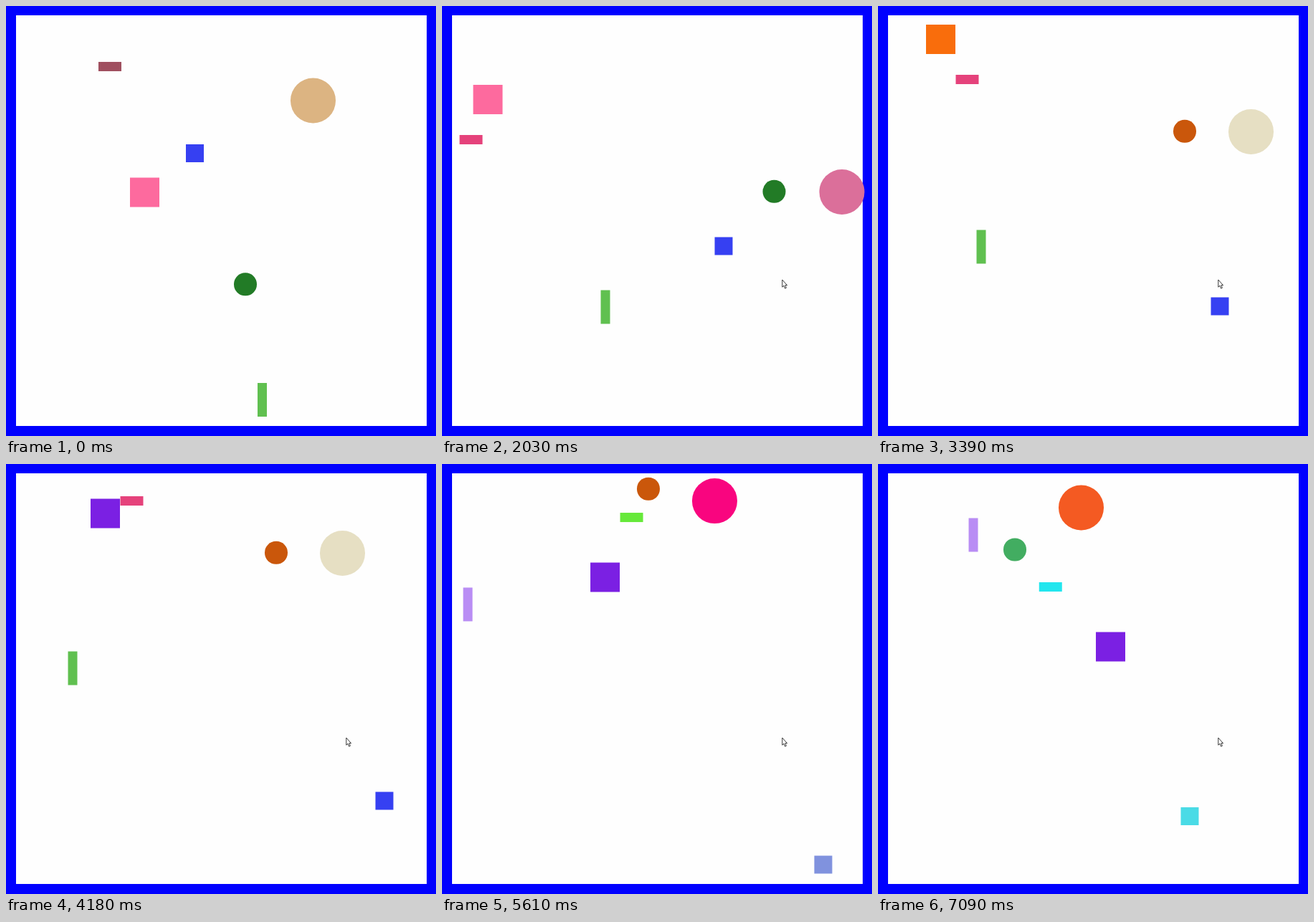
These frames come from a looping animation (600x600 px, 7.15 s). An HTML page without scripts:

```html
<!DOCTYPE html>
<html lang="en">
<head>
<meta charset="utf-8">
<title>Bouncing shapes</title>
<style>
/* --d: distance every shape has travelled along each axis */
@property --d { syntax: "<length>"; inherits: true; initial-value: 0px; }

html, body { margin: 0; width: 100%; height: 100%; overflow: hidden; background: #00f; }

.stage {
  position: relative; width: 600px; height: 600px; overflow: hidden;
  animation: travel 7.15s infinite;
}
.room { position: absolute; left: 14px; top: 12.5px; width: 573px; height: 573.5px; background: #fefefe; }

.shape {
  position: absolute; left: 0; top: 0; width: var(--w); height: var(--h, var(--w));
  background: currentColor;
  transform: translate(var(--x), var(--y));
  animation: 7.15s step-end infinite;
}
.round { border-radius: 50%; }

/* each min/max is one bounce */
.plank {
  --w: 31.5px; --h: 12.5px;
  --x: min(max(129px - var(--d), var(--d) - 105px), 675.25px - var(--d));
  --y: max(min(78px + var(--d), 309.5px - var(--d)), var(--d) - 285.5px);
  animation-name: plank;
}
.ball {
  --w: 62.5px;
  --x: min(max(min(397px + var(--d), 656px - var(--d)), 348.5px + var(--d)), 702.5px - var(--d));
  --y: max(min(max(min(100.5px + var(--d), 357.5px - var(--d)), var(--d) - 333.5px), 447px - var(--d)), var(--d) - 421px);
  animation-name: ball;
}
.box {
  --w: 25px;
  --x: min(251px + var(--d), 873px - var(--d));
  --y: min(193px + var(--d), 929.5px - var(--d));
  animation-name: box;
}
.block {
  --w: 41px;
  --x: max(173px - var(--d), var(--d) - 146.5px);
  --y: max(239.5px - var(--d), var(--d) - 216px);
  animation-name: block;
}
.dot {
  --w: 31.5px;
  --x: min(318px + var(--d), 625.5px - var(--d));
  --y: max(372.3px - var(--d), var(--d) - 347px);
  animation-name: dot;
}
.post {
  --w: 12.5px; --h: 47px;
  --x: max(351px - var(--d), var(--d) - 324px);
  --y: calc(526px - var(--d));
  animation-name: post;
}
.pointer { position: absolute; left: 474px; top: 381px; animation: show 7.15s step-end infinite; }

@keyframes travel {
  0% { --d: 0px; }
  .839% { --d: 0px; animation-timing-function: steps(23, jump-both); }
  15.664% { --d: 71.5px; }
  16.084% { --d: 71.5px; animation-timing-function: steps(19, jump-both); }
  28.392% { --d: 129.5px; }
  29.231% { --d: 129.5px; animation-timing-function: steps(28, jump-both); }
  47.413% { --d: 213.5px; }
  47.832% { --d: 213.5px; animation-timing-function: steps(34, jump-both); }
  69.93% { --d: 318.5px; }
  70.769% { --d: 318.5px; animation-timing-function: steps(24, jump-both); }
  86.434% { --d: 391.5px; }
  86.853% { --d: 391.5px; animation-timing-function: steps(19, jump-both); }
  99.161%, 100% { --d: 450.5px; }
}
@keyframes plank {
  0% { color: #a05060; }
  25.4% { color: #e5427b; }
  65.4% { color: #66e93a; }
  86%, 100% { color: #22e6ee; }
}
@keyframes ball {
  0% { color: #dcb482; }
  28.37% { color: #db6f9a; }
  33.9% { color: #e6dfc3; }
  76.2% { color: #f9057f; }
  95.7%, 100% { color: #f45a22; }
}
@keyframes box {
  0% { color: #3640f2; }
  68.3% { color: #8092de; }
  81.2%, 100% { color: #4adbe6; }
}
@keyframes block {
  0% { color: #fd6a9e; }
  35.2% { color: #f96d0c; }
  50.5%, 100% { color: #7b20e3; }
}
@keyframes dot {
  0% { color: #227b26; }
  33.9% { color: #ca570b; }
  79.2%, 100% { color: #42ad61; }
}
@keyframes post {
  0% { color: #60c050; }
  74.2%, 100% { color: #b98df4; }
}
@keyframes show {
  0% { opacity: 0; }
  .839%, 100% { opacity: 1; }
}
</style>
</head>
<body>
<div class="stage">
  <div class="room"></div>
  <div class="shape plank"></div>
  <div class="shape round ball"></div>
  <div class="shape box"></div>
  <div class="shape block"></div>
  <div class="shape round dot"></div>
  <div class="shape post"></div>
  <svg class="pointer" width="9" height="15" viewBox="0 0 9 15">
    <path d="M.8 1v10.2l2.2-2 1.6 3.9 1.8-.8-1.6-3.6h2.8z" fill="#fff" stroke="#222" stroke-width=".9"/>
  </svg>
</div>
</body>
</html>
```
